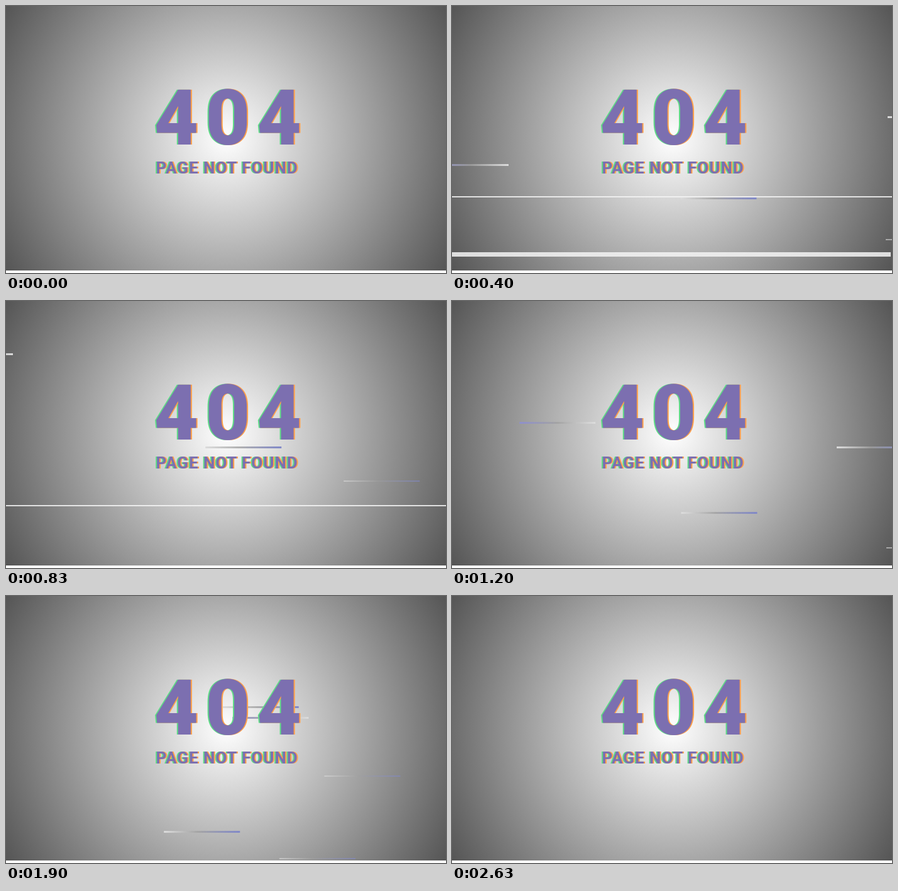
Write an HTML page that moves like this. It is 700 by 424 pixels and loops after 2660 ms.

```html
<!DOCTYPE html>
<html lang="en">
<head>
<meta charset="utf-8">
<title>404 page not found</title>
<style>
  html, body {
    margin: 0;
    width: 100%;
    height: 100%;
    overflow: hidden;
    background: #fff;
  }
  #stage {
    position: absolute;
    width: 700px;
    height: 420px;
    overflow: hidden;
    background: radial-gradient(circle, #fff, #555);
  }
  #stage i {
    position: absolute;
    left: 0;
    visibility: hidden;
    animation: 2660ms linear infinite;
  }
  .right, .left {
    width: 121px;
    height: 3px;
  }
  #stage .right {
    background: linear-gradient(270deg, #dcdcdc, rgba(160, 160, 160, .8) 50%, #8f90cc);
    animation-name: go-right;
  }
  #stage .left {
    background: linear-gradient(90deg, #dcdcdc, rgba(160, 160, 160, .8) 45%, #8088c8);
    animation-name: go-left;
  }
  #stage .thin {
    height: 2px;
    opacity: .6;
  }
  #stage .bar {
    width: 700px;
    background: rgba(245, 245, 245, .85);
    animation-name: flash;
  }
  @keyframes go-right {
    0% { visibility: visible; transform: translateX(-121px); }
    13.53% { visibility: visible; transform: translateX(516px); }
    13.54%, 100% { visibility: hidden; transform: translateX(516px); }
  }
  @keyframes go-left {
    0% { visibility: visible; transform: translateX(700px); }
    15.79% { visibility: visible; transform: translateX(238px); }
    15.8%, 100% { visibility: hidden; transform: translateX(238px); }
  }
  @keyframes flash {
    0%, 2.5% { visibility: visible; }
    2.51%, 100% { visibility: hidden; }
  }
  svg {
    position: absolute;
    left: 0;
    top: 0;
  }
  text { font-family: Roboto, sans-serif; }
  .code { font-size: 122px; font-weight: 900; letter-spacing: 11.2px; }
  .note { font-size: 26px; font-weight: 700; letter-spacing: 1px; }
</style>
</head>
<body>
<div id="stage">
  <div id="streaks"></div>
  <svg width="700" height="420">
    <defs>
      <g id="words">
        <text class="code" x="235.5" y="219.5">404</text>
        <text class="note" x="238.5" y="265.5">PAGE NOT FOUND</text>
      </g>
    </defs>
    <use href="#words" x="-2" fill="#5fdc86"/>
    <use href="#words" x="2" fill="#ffa04a"/>
    <use href="#words" fill="#7c6fb0"/>
  </svg>
</div>
<script>
  // Each entry: top in px, then start times in ms
  const streaks = {
    'right': [[5, 20], [251, 350, 1538], [83, 825], [192, 1072, 1629, 2002], [44, 1446]],
    'right thin': [[404, 835]],
    'left': [[304, 95], [175, 395, 1578], [231, 483, 1121, 2051], [335, 896], [373, 1493]],
    'left thin': [[370, 392], [285, 683, 1725], [391, 1193], [322, 1282, 2014], [416, 1660], [130, 2200]]
  };
  const bars = [[302, 2, 365, 700], [391, 7, 365, 698], [324, 2, 800, 700]];
  const layer = document.getElementById('streaks');

  function add(kind, top, start) {
    const el = document.createElement('i');
    el.className = kind;
    el.style.top = top + 'px';
    el.style.animationDelay = start + 'ms';
    layer.append(el);
    return el;
  }

  for (const [kind, rows] of Object.entries(streaks))
    for (const [top, ...starts] of rows)
      for (const start of starts) add(kind, top, start);

  for (const [top, height, start, width] of bars) {
    const el = add('bar', top, start);
    el.style.height = height + 'px';
    el.style.width = width + 'px';
  }
</script>
</body>
</html>
```
